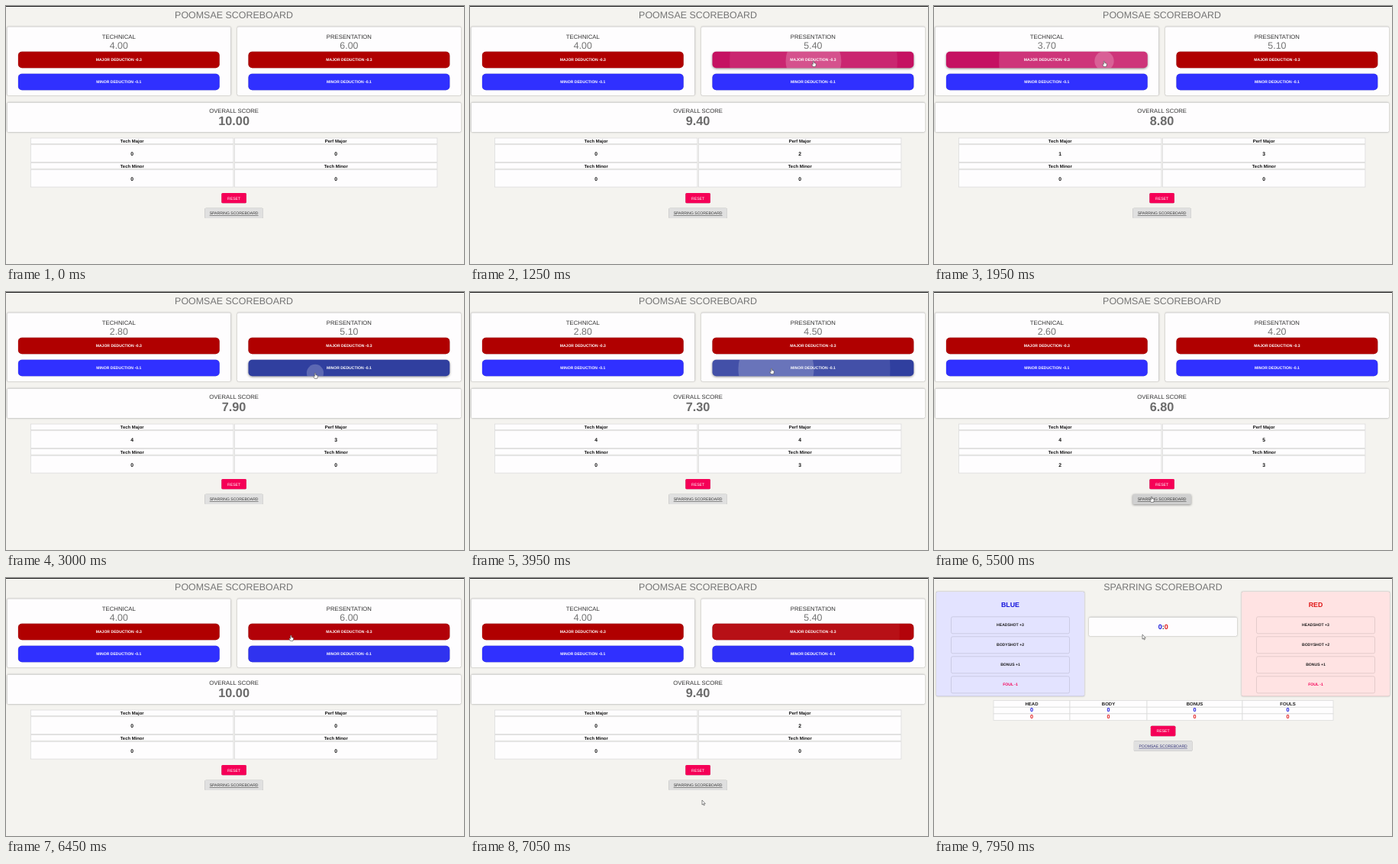
Recreate the animation shown at these times as an HTML page. Size 600 by 338 pixels, loop 8 s.

```html
<!DOCTYPE html>
<html lang="en">
<head>
<meta charset="utf-8">
<title>Scoreboard</title>
<style>
  html, body { margin: 0; width: 100%; height: 100%; overflow: hidden; background: #f4f3ef; }
  svg { display: block; width: 100vw; height: 100vh; }
  text { font-family: "Liberation Sans", Arial, sans-serif; text-anchor: middle; text-rendering: geometricPrecision; }
  .b { font-weight: 700; }
  .u { text-decoration: underline; }
  .card { filter: drop-shadow(0 .7px .4px rgba(0, 0, 0, .32)) drop-shadow(0 .5px .8px rgba(0, 0, 0, .3)); }
  .cell { fill: #fefdfe; stroke: #dcdcdc; stroke-width: .8; }
  .pointer { fill: #fff; stroke: #333; stroke-width: .55; }
</style>
</head>
<body>
<svg id="stage" viewBox="0 0 600 338" preserveAspectRatio="none"></svg>
<script>
const LOOP = 8000, HOLD = 90, RIPPLE = 550, FADE = 250;
const stage = document.getElementById('stage');

function add(parent, tag, attrs, text) {
  const el = document.createElementNS('http://www.w3.org/2000/svg', tag);
  for (const k in attrs) el.setAttribute(k, attrs[k]);
  if (text !== undefined) el.textContent = text;
  parent.appendChild(el);
  return el;
}
const label = (g, x, y, size, fill, text, cls = '') =>
  add(g, 'text', { x, y, 'font-size': size, fill, class: cls }, text);
const box = (g, x, y, width, height, more) => add(g, 'rect', { x, y, width, height, ...more });
const card = (g, x, y, w, h, fill = '#fefdfe') => box(g, x, y, w, h, { fill, rx: 1.6, class: 'card' });

const pages = [add(stage, 'g', {}), add(stage, 'g', {})];
const [forms, sparring] = pages;
box(stage, 0, 0, 600, 1, { fill: '#1a1a1a' });

// Buttons: a fill that fades to its hover colour, and ripples clipped to the shape
const RED = [176, 0, 0], BLUE = [48, 48, 255], PINK = [245, 0, 87], GREY = [224, 224, 224];
const DARK_PINK = [197, 17, 98], INDIGO = [48, 63, 159], DARK_GREY = [208, 208, 208];
const buttons = [];

function button(page, kind, mid, y, w, h, rx, base, hot, ink, text, cls) {
  const g = add(pages[page], 'g', {}), id = 'clip' + buttons.length, x = mid - w / 2;
  const rect = box(g, x, y, w, h, { rx });
  box(add(g, 'clipPath', { id }), x, y, w, h, { rx });
  const waves = add(g, 'g', { 'clip-path': `url(#${id})` });
  label(g, mid, y + h / 2 + 1.9, 5.1, ink, text, cls);
  buttons.push({ page, kind, x, y, w, h, base, hot, rect, waves });
}
function footer(page, mid, y, gap, text) {
  button(page, 'reset', mid, y, 32.5, 13.4, 1.5, PINK, DARK_PINK, '#fff', 'RESET', '');
  button(page, 'link', mid, y + gap, 76.5, 13.4, 1.5, GREY, DARK_GREY, page ? '#33337a' : '#333', text, 'u');
}

// Page 0: form scoring
label(forms, 298.5, 15.5, 12.45, '#757575', 'POOMSAE SCOREBOARD');
card(forms, 1.5, 126.5, 594.5, 38.7);
label(forms, 298.6, 139.5, 7.7, '#333', 'OVERALL SCORE');
const total = label(forms, 298.6, 155.8, 16.3, '#6b6b6b', '', 'b');

const sides = ['TECHNICAL', 'PRESENTATION'].map((name, i) => {
  const mid = 147.8 + i * 301.6, col = 32.5 + i * 267, cell = col + 132.7;
  card(forms, mid - 146.4, 27.2, 293, 89.7);
  label(forms, mid, 43, 7.75, '#333', name);
  const score = label(forms, mid, 56.3, 12.4, '#757575', '');
  button(0, 'major' + i, mid, 59.7, 263.8, 21.5, 5, RED, DARK_PINK, '#fff', 'MAJOR DEDUCTION -0.3', 'b');
  button(0, 'minor' + i, mid, 88.7, 263.8, 21.5, 5, BLUE, INDIGO, '#fff', 'MINOR DEDUCTION -0.1', 'b');
  const counts = [i ? 'Perf Major' : 'Tech Major', 'Tech Minor'].map((title, r) => {
    const y = 173 + r * 32.6;
    box(forms, col, y, 265.4, 7.6, { class: 'cell' });
    box(forms, col, y + 8.7, 265.4, 22.8, { class: 'cell' });
    label(forms, cell, y + 6.1, 5.9, '#111', title, 'b');
    return label(forms, cell, y + 22.9, 6.8, '#111', '', 'b');
  });
  return { score, counts, start: 4 + 2 * i };
});
footer(0, 298.6, 244.9, 19.8, 'SPARRING SCOREBOARD');

// Page 1: sparring
const INKS = ['#1414dc', '#e01818'];
label(sparring, 300, 15.5, 12.4, '#757575', 'SPARRING SCOREBOARD');
['BLUE', 'RED'].forEach((name, i) => {
  const mid = 100 + i * 400;
  card(sparring, mid - 97, 18, 194, 136.7, i ? '#ffe3e3' : '#e3e3ff');
  label(sparring, mid, 37.5, 8.8, INKS[i], name, 'b');
  ['HEADSHOT +3', 'BODYSHOT +2', 'BONUS +1', 'FOUL -1'].forEach((text, r) => {
    const y = 50.8 + r * 26;
    box(sparring, mid - 77.5, y, 155, 22, { fill: 'none', rx: 2, stroke: i ? '#dec6c6' : '#c6c6de', 'stroke-width': .8 });
    label(sparring, mid, y + 12.6, 5.1, r < 3 ? '#1c1c1c' : '#f50057', text, 'b');
  });
});
card(sparring, 203, 51.5, 194, 24.5);
const tally = label(sparring, 300.3, 67, 9, '#222', '', 'b');
[INKS[0], '#222', INKS[1]].forEach((fill, i) => add(tally, 'tspan', { fill }, i === 1 ? ':' : '0'));

let left = 78;
for (const [name, w] of Object.entries({ HEAD: 100, BODY: 101, BONUS: 125, FOULS: 119 })) {
  [name, '0', '0'].forEach((text, r) => {
    const y = 160.5 + r * 8.7;
    box(sparring, left, y, w, 8.7, { class: 'cell' });
    label(sparring, left + w / 2, y + 6.2, r ? 7.2 : 6, r ? INKS[r - 1] : '#1c1c1c', text, 'b');
  });
  left += w;
}
footer(1, 300.1, 193.8, 19.5, 'POOMSAE SCOREBOARD');

// Each visit: arrival time, place, number of presses
const GAP = 155, SETTLE = 60;
const visits = [
  [650, 446, 13, 0], [890, 450, 72, 3], [1656, 223, 72, 4], [2860, 405, 106, 1],
  [3280, 402, 73, 1], [3590, 401, 101, 2], [3945, 395, 100, 0], [4200, 396, 72, 1],
  [4700, 230, 100, 2], [5220, 285, 268, 0], [5790, 297, 251, 1], [6479, 375, 71, 2],
  [7030, 304, 291, 0], [7390, 300, 270, 1], [7860, 273, 74, 0]
].map(([at, x, y, clicks]) => ({ at, x, y, clicks }));

const within = (b, x, y) => x >= b.x && x <= b.x + b.w && y >= b.y && y <= b.y + b.h;
const presses = visits.flatMap(v => Array.from({ length: v.clicks }, (_, i) => {
  const b = buttons.find(b => b.page === 0 && within(b, v.x, v.y));
  const r = Math.max(v.x - b.x, b.x + b.w - v.x);
  return { at: v.at + SETTLE + i * GAP, kind: b.kind, r, el: add(b.waves, 'circle', { cx: v.x, cy: v.y, fill: '#fff' }) };
}));
const switchAt = presses.find(p => p.kind === 'link').at + HOLD;
const pageAt = t => +(t >= switchAt);

const hand = add(stage, 'path', { class: 'pointer', d: 'M-.7 .5Q0-.5 .7 .5V2.6L2.9 3.2Q3.6 3.6 3.4 4.6L2.7 7.4H-.7L-2.4 4.6Q-2.2 3.6-.7 4.6Z' });
const arrow = add(stage, 'path', { class: 'pointer', d: 'M0 0V6.1L1.4 4.9L2.4 7L3.3 6.6L2.4 4.6H4.3Z' });

// The pointer rests after its presses, then leaves in time for the next visit
function pointer(t) {
  const i = visits.findLastIndex(v => v.at <= t);
  const a = visits[Math.max(i, 0)], b = visits[i + 1];
  if (i < 0 || !b) return [a.x, a.y];
  const travel = 120 + Math.hypot(b.x - a.x, b.y - a.y);
  const free = a.clicks ? a.at + SETTLE + (a.clicks - 1) * GAP + 100 : a.at;
  const go = Math.max(free, b.at - travel);
  const k = Math.max(0, (t - go) / (b.at - go)), s = k * k * (3 - 2 * k);
  return [a.x + (b.x - a.x) * s, a.y + (b.y - a.y) * s];
}

// cubic-bezier(.4, 0, .2, 1)
function ease(x) {
  if (x <= 0) return 0;
  if (x >= 1) return 1;
  let lo = 0, hi = 1, s;
  for (let i = 0; i < 18; i++) {
    s = (lo + hi) / 2;
    if (1.2 * s * (1 - s) ** 2 + .6 * s * s * (1 - s) + s ** 3 < x) lo = s; else hi = s;
  }
  return s * s * (3 - 2 * s);
}

const over = (b, t) => t >= visits[0].at && pageAt(t) === b.page && within(b, ...pointer(t));
function hoverLevel(b, t) {
  let n = 0;
  for (let i = 0; i < 12; i++) n += over(b, t - i * FADE / 12);
  return n / 12;
}

function draw(t) {
  pages.forEach((p, i) => p.setAttribute('display', i === pageAt(t) ? 'inline' : 'none'));

  let done = presses.filter(p => p.at + HOLD <= t).map(p => p.kind);
  done = done.slice(done.lastIndexOf('reset') + 1);
  const points = sides.map((side, i) => {
    const [major, minor] = ['major', 'minor'].map(k => done.filter(d => d === k + i).length);
    const left = side.start - major * .3 - minor * .1;
    side.counts[0].textContent = major;
    side.counts[1].textContent = minor;
    side.score.textContent = left.toFixed(2);
    return left;
  });
  total.textContent = (points[0] + points[1]).toFixed(2);

  for (const b of buttons) {
    const h = hoverLevel(b, t);
    b.rect.setAttribute('fill', `rgb(${b.base.map((c, i) => Math.round(c + (b.hot[i] - c) * h))})`);
    b.rect.style.filter = `drop-shadow(0 ${.7 + h * .8}px ${.6 + h}px rgba(0,0,0,.42))`;
  }
  for (const p of presses) {
    const age = t - p.at;
    p.el.setAttribute('r', p.r * ease(age / RIPPLE));
    p.el.setAttribute('opacity', .21 * (1 - ease((age - HOLD) / RIPPLE)));
  }

  const [x, y] = pointer(t), pressable = buttons.some(b => over(b, t));
  [[hand, pressable], [arrow, !pressable]].forEach(([el, on]) => {
    el.setAttribute('transform', `translate(${x} ${y})`);
    el.setAttribute('display', on && t >= visits[0].at ? 'inline' : 'none');
  });
}

const start = performance.now();
function tick() {
  draw((performance.now() - start) % LOOP);
  requestAnimationFrame(tick);
}
tick();
</script>
</body>
</html>
```
